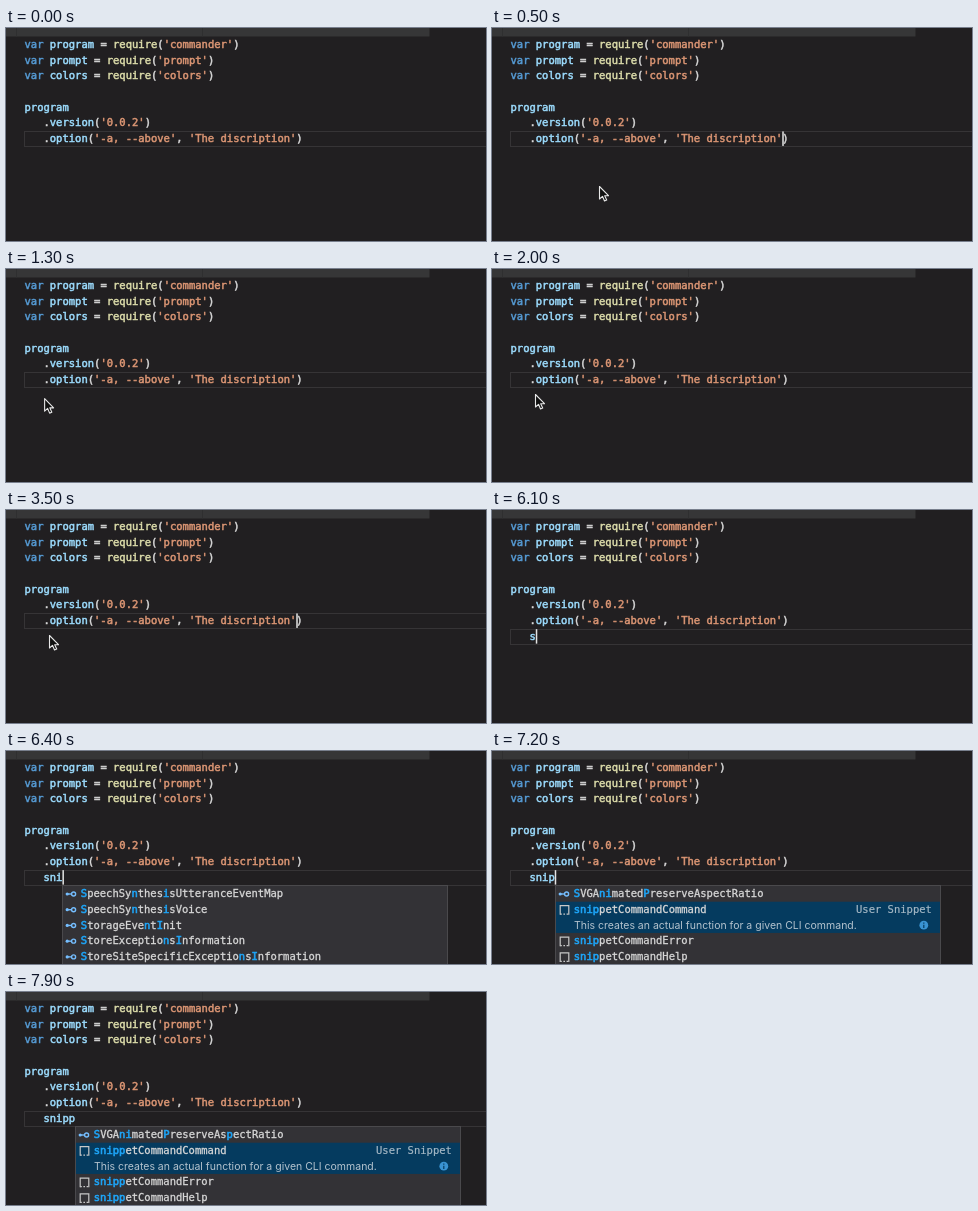
Animation, 480 px wide and 213 px high, one loop 8000 ms. Source, as an HTML page:

```html
<!DOCTYPE html>
<html lang="en">
<head>
<meta charset="utf-8">
<title>Snippet completion</title>
<style>
  html, body { margin: 0; width: 100%; height: 100%; overflow: hidden; background: #211f21; }
  svg { display: block; width: 100vw; height: 100vh; }
  text { white-space: pre; font: 10.5px "DejaVu Sans Mono", "Liberation Mono", monospace; }
  text.note { font: 10.5px Inter, "Liberation Sans", sans-serif; }
</style>
</head>
<body>
<svg id="stage" viewBox="0 0 480 213"></svg>
<script>
const LOOP = 8000, STEP = 100;
const LEFT = 18.5, BASE = 19.8, LINE = 15.72, CHAR = 6.32;
const INDENT = LEFT + 3 * CHAR;
const color = {
  key: '#569cd6', name: '#9cdcfe', call: '#dcdcaa', str: '#dc9674',
  plain: '#d8d8d8', match: '#1ea5f8', icon: '#75beff', selected: '#053b5f'
};

const stage = document.getElementById('stage');

function add(parent, tag, attrs = {}) {
  const el = document.createElementNS('http://www.w3.org/2000/svg', tag);
  for (const k in attrs) el.setAttribute(k, attrs[k]);
  parent.appendChild(el);
  return el;
}

// parts: [colour, string, optional stroke weight]
function write(parent, x, y, parts) {
  const text = add(parent, 'text', { x, y });
  for (const [fill, str, weight = 0.5] of parts) {
    add(text, 'tspan', { fill, stroke: fill, 'stroke-width': weight }).textContent = str;
  }
  return text;
}

const baseline = row => BASE + row * LINE;
const show = (el, on) => el.setAttribute('visibility', on ? 'visible' : 'hidden');
const move = (el, x, y) => el.setAttribute('transform', `translate(${x} ${y})`);

// Editor
add(stage, 'rect', { width: 480, height: 213, fill: '#211f21' });
add(stage, 'rect', { width: 423.5, height: 8.5, fill: '#363637' });
add(stage, 'path', { d: 'M10.5 0V8.5M196.5 0V8.5', stroke: '#2f2f30' });
const lineBox = add(stage, 'rect', {
  x: 18.5, width: 470, height: 15, fill: 'none', stroke: '#363436'
});

const { key, name, call, str, plain } = color;
[['program', 'commander'], ['prompt', 'prompt'], ['colors', 'colors']].forEach(([id, lib], i) =>
  write(stage, LEFT, baseline(i), [
    [key, 'var '], [name, id], [plain, ' = '], [call, 'require'],
    [plain, '('], [str, `'${lib}'`], [plain, ')']
  ]));
write(stage, LEFT, baseline(4), [[name, 'program']]);
write(stage, INDENT, baseline(5), [
  [plain, '.'], [name, 'version'], [plain, '('], [str, "'0.0.2'"], [plain, ')']
]);
write(stage, INDENT, baseline(6), [
  [plain, '.'], [name, 'option'], [plain, '('], [str, "'-a, --above'"],
  [plain, ', '], [str, "'The discription'"], [plain, ')']
]);
const typed = write(stage, INDENT, baseline(7), [[name, '']]).firstChild;
const caret = add(stage, 'rect', { width: 1.5, height: 14.5, fill: '#e4e4e4' });

// Completion list
function label(parent, y, marked) {
  const parts = marked.split(/(\[\w+\])/).filter(Boolean).map(s =>
    s[0] === '[' ? [color.match, s.slice(1, -1), 0.6] : [plain, s, 0.3]);
  write(parent, 18.8, y, parts);
}

function typeIcon(parent, y) {
  const g = add(parent, 'g', { fill: 'none', stroke: color.icon, 'stroke-width': 1.4 });
  add(g, 'path', { d: `M5 ${y}H9.5` });
  add(g, 'circle', { cx: 5.2, cy: y, r: 1.6, fill: color.icon, stroke: 'none' });
  add(g, 'circle', { cx: 11.6, cy: y, r: 2 });
}

function snippetIcon(parent, y) {
  const g = add(parent, 'g', { fill: 'none', stroke: '#c8c8c8', 'stroke-width': 1.2 });
  add(g, 'path', { d: `M5.2 ${y + 5}V${y - 4}H13.8V${y + 5}` });
  add(g, 'path', { d: `M5.2 ${y + 4.5}H13.8`, 'stroke-dasharray': '1.6 1.6' });
}

// items: [marked label, is snippet, is selected]
function makeList(items) {
  const g = add(stage, 'g');
  add(g, 'rect', { x: 0.5, y: 0.5, width: 385, height: 90, fill: '#333236', stroke: '#4a494c' });
  let y = 9;
  for (const [marked, snippet, selected] of items) {
    if (selected) {
      add(g, 'rect', { x: 1, y: y - 8, width: 384, height: 31.2, fill: color.selected });
      write(g, 301, y + 3.3, [['#a5b8c5', 'User Snippet', 0.2]]);
      const note = add(g, 'text', { class: 'note', x: 19, y: y + 19.2, fill: '#b4c3ce' });
      note.textContent = 'This creates an actual function for a given CLI command.';
      add(g, 'circle', { cx: 368.8, cy: y + 15.5, r: 4.4, fill: '#3a93d2' });
      add(g, 'path', {
        d: `M368.8 ${y + 12.8}v1.2M368.8 ${y + 15}v3.2`, stroke: color.selected, 'stroke-width': 1.2
      });
    }
    (snippet ? snippetIcon : typeIcon)(g, y);
    label(g, y + 3.3, marked);
    y += LINE * (selected ? 2 : 1);
  }
  return g;
}

const snippetItems = (type, word) => [
  [type],
  ...['Command', 'Error', 'Help'].map((end, i) =>
    ['snippet'.replace(word, `[${word}]`) + 'Command' + end, true, i === 0])
];

// Each list opens at the caret at its own moment
const lists = [
  { at: 6400, chars: 3, el: makeList([
    ['[S]peechSy[n]thes[i]sUtteranceEventMap'],
    ['[S]peechSy[n]thes[i]sVoice'],
    ['[S]torageEve[n]t[I]nit'],
    ['[S]toreExceptio[n]s[I]nformation'],
    ['[S]toreSiteSpecificExceptio[n]s[I]nformation']
  ]) },
  { at: 7000, chars: 4, el: makeList(snippetItems('[S]VGA[ni]mated[P]reserveAspectRatio', 'snip')) },
  { at: 7400, chars: 5, el: makeList(snippetItems('[S]VGA[ni]mated[P]reserveAs[p]ectRatio', 'snipp')) }
];
for (const { el, chars } of lists) move(el, Math.round(INDENT + chars * CHAR), 134);

const pointer = add(stage, 'path', {
  d: 'M0 0V12.5L3 9.8 5 14.5 7.2 13.6 5.2 9.2H9Z',
  fill: '#111', stroke: '#e8e8e8', 'stroke-width': 1.1, 'stroke-linejoin': 'round'
});

// Timeline
const ENTER = 3900;
const keys = [[5900, 's'], [6300, 'sni'], [7000, 'snip'], [7400, 'snipp']];
const path = [
  [100, 150, 179], [500, 107.5, 158.5], [700, 66, 131], [900, 66, 131],
  [1200, 37, 131], [1600, 43.5, 125.5], [ENTER, 43.5, 125.5]
];

function pointAt(t) {
  const i = Math.max(1, path.findIndex(p => p[0] >= t));
  const [t0, x0, y0] = path[i - 1], [t1, x1, y1] = path[i];
  const k = (t - t0) / (t1 - t0);
  return [x0 + (x1 - x0) * k, y0 + (y1 - y0) * k];
}

function draw(ms) {
  const t = Math.floor((ms % LOOP) / STEP) * STEP;
  const entered = t >= ENTER;
  const row = entered ? 7 : 6;
  const [since, word] = keys.filter(k => k[0] <= t).pop() || [entered ? ENTER : 500, ''];

  typed.textContent = word;
  lineBox.setAttribute('y', Math.round(baseline(row) - 11) + 0.5);

  const caretX = entered ? INDENT + word.length * CHAR : LEFT + 43 * CHAR;
  move(caret, caretX, baseline(row) - 10.7);
  show(caret, Math.floor((t - since) / 500) % 2 === 0);

  const open = lists.filter(l => l.at <= t).pop();
  for (const l of lists) show(l.el, l === open);

  const moving = t >= path[0][0] && !entered;
  show(pointer, moving);
  if (moving) move(pointer, ...pointAt(t));
}

const start = performance.now();
function tick() {
  draw(performance.now() - start);
  requestAnimationFrame(tick);
}
tick();
</script>
</body>
</html>
```
